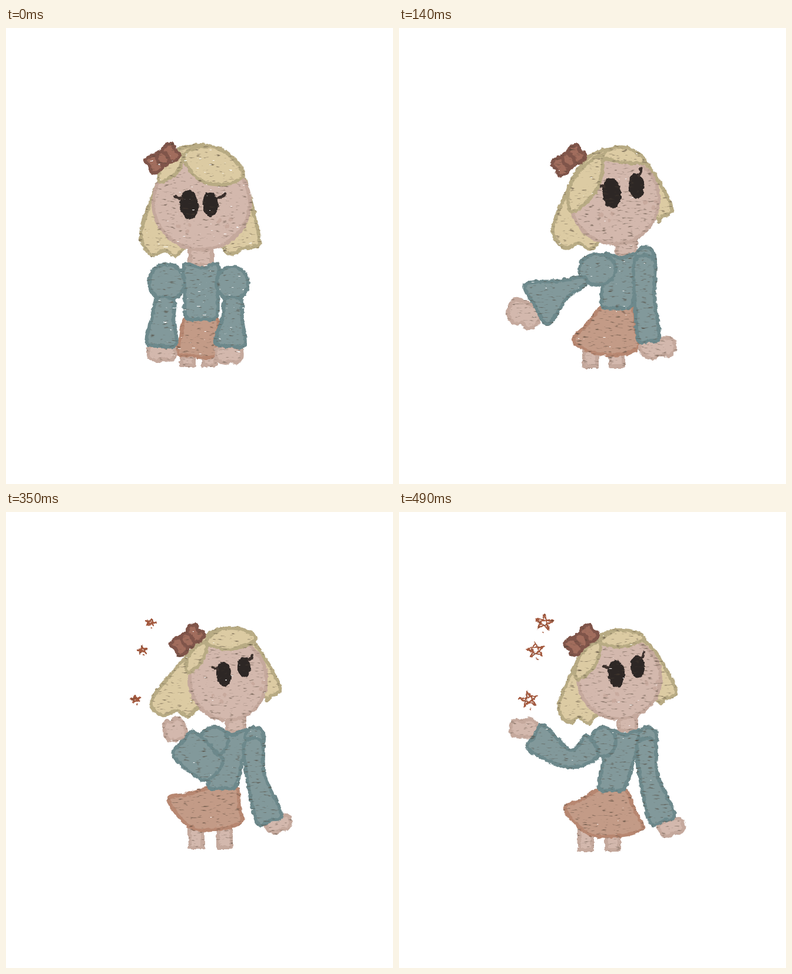
Animation, 657 px wide and 776 px high, one loop 0.56 s. Source, as an HTML page:

```html
<!DOCTYPE html>
<html lang="en">
<head>
<meta charset="utf-8">
<title>Doll conjuring stars</title>
<style>
  html, body { margin: 0; width: 100%; height: 100%; overflow: hidden; background: #fff; }
  svg {
    position: absolute; left: 0; top: 0; width: 657px; height: 776px;
    opacity: 0; will-change: opacity;
    animation: show 560ms step-end infinite;
  }
  @keyframes show { 0% { opacity: 1 } 12.5%, 100% { opacity: 0 } }
</style>
</head>
<body>
<script>
const colors = {
  hair: ['#dccba3', '#b8ab84'], skin: ['#d3b8ad', '#c5a99d'], wool: ['#82999b', '#6d898c'],
  skirt: ['#c39b87', '#b78771'], bow: ['#a16d5d', '#80554a']
};
const paint = name => `fill="${colors[name][0]}" stroke="${colors[name][1]}" stroke-width="6"`;

const lerp = (a, b, t) => a + (b - a) * t;
const shift = (p, n, k) => [p[0] + n[0] * k, p[1] + n[1] * k];
const along = (a, b, t) => [lerp(a[0], b[0], t), lerp(a[1], b[1], t)];
const normal = (a, b) => [a[1] - b[1], b[0] - a[0]];
const unit = ([x, y]) => [x / Math.hypot(x, y), y / Math.hypot(x, y)];
const turned = (inner, x, y, angle, scale = 1) =>
  `<g transform="translate(${x} ${y}) rotate(${angle}) scale(${scale})">${inner}</g>`;

// Closed Catmull-Rom curve through the points.
function blob(p, name) {
  const at = i => p[(i + p.length) % p.length];
  const handle = (i, sign) => along(at(i), shift(at(i), normal2(at(i - 1), at(i + 1)), sign), 1 / 6);
  const curve = p.map((_, i) => `C${handle(i, 1)} ${handle(i + 1, -1)} ${at(i + 1)}`).join('');
  return `<path d="M${p[0]}${curve}Z" ${paint(name)}/>`;
}
function normal2(a, b) { return [b[0] - a[0], b[1] - a[1]]; }

const oval = (x, y, rx, ry, look) => `<ellipse cx="${x}" cy="${y}" rx="${rx}" ry="${ry}" ${look}/>`;
const box = (x, y, w, bottom) =>
  `<rect x="${x}" y="${y}" width="${w}" height="${bottom - y}" ${paint('skin')}/>`;

function hair([cx, cy, rx, ry], top, [lx, ly, lw], [ex, ey, ew]) {
  const crown = [cx - rx / 2 - (cx - lx) / 4, cy - ry * 0.65];
  const side = [lx, lerp(ly, cy, 0.35)];
  return blob([
    [cx, top], [cx - rx * 0.55, top + 12], crown, shift(along(crown, side, 0.5), [-1, 0], 4), side,
    [lx + lw * 0.25, ly], [lx + lw * 0.55, ly - 8], [lx + lw * 0.78, ly + 2], [lx + lw, ly - 12],
    [cx, cy + ry * 0.4],
    [ex - ew, ey - 6], [ex - ew * 0.7, ey + 1], [ex - ew / 2, ey - 8], [ex - ew * 0.15, ey - 11], [ex, ey - 26],
    [cx + rx / 2 + (ex - cx) * 0.3, cy - ry * 0.6], [cx + rx * 0.55, top + 16]
  ], 'hair');
}

function lock(part, tip) {
  const n = normal(tip, part);
  return blob([
    part, shift(along(part, tip, 0.5), n, 0.17), tip,
    shift(along(part, tip, 0.8), n, -0.2), shift(along(part, tip, 0.4), n, -0.22)
  ], 'hair');
}

function bang(part, [x, y, rise, sag]) {
  const end = [x, y], n = unit(normal(part, end));
  const edge = (t, k) => shift(along(part, end, t), n, k);
  return blob([
    part, edge(0.2, -rise * 0.75), edge(0.5, -rise), edge(0.82, -rise * 0.65),
    end, edge(0.8, sag * 0.7), edge(0.45, sag), edge(0.2, sag * 0.7)
  ], 'hair');
}

function bow([x, y, angle]) {
  const lobe = side => blob([[4, -8], [15, -15], [27, -12], [25, 0], [29, 9], [18, 15], [4, 8]]
    .map(([u, v]) => [u * side, v]), 'bow');
  return turned(lobe(-1) + lobe(1) + oval(0, 0, 9, 13, paint('bow')), x, y, angle);
}

function eyes([x1, y1, x2, y2, size], [dx, dy]) {
  const eye = (x, y, s, tilt) => turned(oval(0, 0, s * 0.62, s, 'fill="#2d2725"'), x, y, tilt);
  const lash = (...p) => `<polyline points="${p}" fill="none" stroke="#3b302c" stroke-width="5"/>`;
  const freckles = (x, y) => [[-10, -4], [4, 5], [9, -6]]
    .map(([u, v]) => oval(x + u, y + v, 3.5, 3.5, 'fill="#c8aa9e"')).join('');
  const s = size * 0.84;
  return freckles(x1 - 8, y1 + 41) + freckles(x2 + 25, y2 + 32) +
    eye(x1, y1, size, -5) + eye(x2, y2, s, -3) +
    lash(x1 - size * 0.5, y1 - size * 0.4, x1 - size * 0.8, y1 - size * 0.5, x1 - size * 0.95, y1 - size * 0.55) +
    lash(x2 + dx * 0.5, y2 + dy * 0.6, x2 + dx * 0.9, y2 + dy * 0.8, x2 + dx, y2 + dy);
}

function sleeve([ax, ay, aw], [ex, ey, ew], [cx, cy, cw]) {
  const a = [ax, ay], e = [ex, ey], c = [cx, cy];
  const na = unit(normal(a, e)), ne = unit(normal(a, c)), nc = unit(normal(e, c));
  return blob([
    shift(a, na, aw / 2), shift(e, ne, ew / 2), shift(c, nc, cw / 2),
    shift(c, [nc[1], -nc[0]], 4),
    shift(c, nc, -cw / 2), shift(e, ne, -ew / 2), shift(a, na, -aw / 2)
  ], 'wool');
}

const hand = ([x, y, w, h, angle]) => turned(blob(
  [[-0.9, -0.9], [-1, 0.4], [-0.4, 1], [0.1, 0.7], [0.6, 0.9], [1, 0.3], [0.8, -0.9]]
    .map(([u, v]) => [u * w, v * h]), 'skin'), x, y, angle);

function skirt([wl, wr, y], [lx, ly], [rx, ry], bottom) {
  return blob([
    [wl, y], [(wl + wr) / 2, y], [wr, y], along([wr, y], [rx, ry], 0.55), [rx, ry],
    [lerp(lx, rx, 0.7), bottom], [lerp(lx, rx, 0.3), bottom - 4], [lx, ly], along([wl, y], [lx, ly], 0.55)
  ], 'skirt');
}

function torso([l, r, y], [wl, wr, waist]) {
  return blob([
    [l, y], [(l + r) / 2, y + 6], [r, y], along([r, y], [wr, waist], 0.5), [wr - 2, waist - 3],
    [(wl + wr) / 2, waist], [wl + 2, waist - 3], along([l, y], [wl, waist], 0.5)
  ], 'wool');
}

function stars([r, flat]) {
  const tips = [0, 1, 2, 3, 4].map(i => {
    const a = i * Math.PI * 0.8 - Math.PI / 2;
    return [r * Math.cos(a), r * flat * Math.sin(a)];
  });
  const shape = `<path d="M${tips.join('L')}Z" fill="none" stroke="#a4593e" stroke-width="2.6"/>` +
    oval(1, r, 1.3, 1.3, 'fill="#a4593e"');
  return turned(shape, 246, 188, 6) + turned(shape, 232, 235, -8) + turned(shape, 220, 319, -9);
}

// Limb joints are [x, y, width]; hair ends are [x, y, width of the curl].
const front = {
  face: [332, 298, 82, 79], top: [199], curlL: [229, 386, 73], curlR: [430, 383, 60],
  part: [302, 216], lockTip: [262, 262], bang: [402, 252, 30, 32], bow: [266, 222, -34],
  eyes: [311, 301, 347, 300, 25], lash: [26, -18],
  neck: [331, 38, 403], legs: [297, 334, 560, 574],
  waist: [304, 359, 495], hemL: [291, 553], hemR: [357, 556], hem: [561], shoulders: [303, 360, 403],
  puffL: [273, 433, 30, 31], puffR: [384, 434, 27, 28],
  armL: [271, 462, 28], elbowL: [266, 495, 37], cuffL: [264, 537, 50],
  armR: [386, 462, 26], elbowR: [384, 495, 34], cuffR: [381, 537, 50],
  handL: [265, 554, 22, 13, 0], handR: [379, 557, 21, 14, 0]
};
const lean = {
  face: [344, 304, 65, 65], top: [227], curlL: [252, 379, 57], curlR: [430, 359, 38],
  part: [302, 238], lockTip: [281, 310], bang: [380, 243, 14, 7], bow: [284, 230, -41],
  eyes: [330, 291, 365, 281, 22], lash: [9, -24],
  neck: [348, 36, 400], legs: [302, 335, 556, 574],
  waist: [308, 364, 486], hemL: [283, 545], hemR: [383, 550], hem: [557], shoulders: [313, 378, 398],
  puffL: [303, 414, 18, 17], puffR: [384, 416, 16, 18],
  armL: [298, 420, 34], elbowL: [268, 475, 40], cuffL: [248, 524, 58],
  armR: [386, 415, 30], elbowR: [390, 475, 24], cuffR: [403, 532, 38],
  handL: [246, 538, 20, 12, 5], handR: [405, 549, 18, 10, 0]
};
const reach = {
  face: [366, 292, 75, 75], top: [205], curlL: [261, 374, 80], curlR: [462, 328, 30],
  part: [344, 218], lockTip: [296, 313], bang: [418, 228, 20, 6], bow: [288, 225, -38],
  eyes: [361, 281, 403, 269, 26], lash: [8, -30],
  neck: [386, 33, 386], legs: [314, 359, 550, 576],
  waist: [343, 397, 476], hemL: [296, 532], hemR: [406, 543], hem: [556], shoulders: [350, 405, 386],
  puffL: [337, 411, 31, 26], puffR: [418, 396, 17, 23],
  armL: [314, 430, 14], elbowL: [278, 445, 32], cuffL: [234, 470, 78],
  armR: [417, 395, 33], elbowR: [417, 460, 33], cuffR: [424, 528, 36],
  handL: [212, 488, 26, 20, 25], handR: [440, 545, 28, 16, -6]
};
const cross = {
  face: [374, 287, 74, 64], top: [199], curlL: [272, 361, 72], curlR: [473, 323, 33],
  part: [341, 213], lockTip: [300, 296], bang: [412, 218, 15, 12], bow: [305, 215, -38],
  eyes: [368, 275, 404, 264, 23], lash: [17, -26],
  neck: [385, 34, 388], legs: [309, 360, 550, 573],
  waist: [333, 398, 480], hemL: [279, 513], hemR: [401, 543], hem: [553], shoulders: [352, 400, 387],
  puffL: [344, 409, 28, 26], puffR: [423, 411, 20, 26],
  armL: [342, 427, 22], elbowL: [375, 458, 40], cuffL: [421, 398, 68],
  armR: [422, 410, 34], elbowR: [428, 460, 30], cuffR: [446, 522, 54],
  handL: [426, 373, 19, 19, 180], handR: [457, 541, 24, 16, -5]
};
const windUp = {
  ...cross,
  face: [377, 285, 65, 69], top: [197], curlL: [246, 346, 80], curlR: [464, 320, 29],
  part: [340, 221], lockTip: [310, 273], bang: [424, 214, 20, 16], bow: [308, 218, -40],
  eyes: [370, 276, 404, 264, 21], lash: [14, -19],
  neck: [390, 30, 374], legs: [312, 360, 537, 571],
  waist: [342, 392, 470], hemL: [276, 490], hemR: [399, 527], hem: [540], shoulders: [356, 411, 373],
  puffL: [353, 390, 24, 24], puffR: [422, 385, 16, 19],
  armL: [362, 418, 20], elbowL: [347, 432, 52], cuffL: [302, 395, 54],
  armR: [420, 392, 30], elbowR: [424, 450, 30], cuffR: [447, 521, 44],
  handL: [286, 369, 17, 18, 165], handR: [463, 531, 20, 13, -15], stars: [9, 0.65]
};
const cast = {
  ...windUp,
  face: [374, 283, 70, 69], top: [201], curlL: [271, 358, 64], curlR: [469, 325, 34],
  part: [341, 220], lockTip: [305, 285], bang: [416, 214, 16, 12], bow: [310, 218, -40],
  eyes: [369, 275, 405, 263, 23], lash: [10, -23],
  neck: [388, 30, 372], legs: [306, 352, 541, 575],
  waist: [338, 385, 473], hemL: [282, 505], hemR: [413, 538], hem: [551],
  puffL: [347, 391, 21, 25],
  armL: [328, 398, 40], elbowL: [290, 420, 29], cuffL: [233, 384, 48],
  handL: [212, 367, 22, 15, 180], handR: [463, 537, 20, 13, -12], stars: [16, 0.85]
};

const midway = (a, b) => Object.fromEntries(
  Object.keys(a).map(key => [key, a[key].map((v, i) => lerp(v, b[key][i], 0.5))]));

const figure = p => [
  hair(p.face, p.top[0], p.curlL, p.curlR),
  box(p.neck[0] - p.neck[1] / 2, p.face[1] + p.face[3] - 4, p.neck[1], p.neck[2]),
  box(p.legs[0], p.legs[2], 22, p.legs[3]),
  box(p.legs[1], p.legs[2], 22, p.legs[3]),
  skirt(p.waist, p.hemL, p.hemR, p.hem[0]),
  hand(p.handL), hand(p.handR),
  torso(p.shoulders, p.waist),
  oval(...p.puffR, paint('wool')), sleeve(p.armR, p.elbowR, p.cuffR),
  oval(...p.puffL, paint('wool')), sleeve(p.armL, p.elbowL, p.cuffL),
  oval(...p.face, paint('skin')),
  eyes(p.eyes, p.lash),
  lock(p.part, p.lockTip), bang(p.part, p.bang), bow(p.bow),
  p.stars ? stars(p.stars) : ''
].join('');

// Rough crayon edges, dark horizontal grain and small gaps.
const crayon = (id, gap) => `
  <filter id="crayon${id}" filterUnits="userSpaceOnUse" x="170" y="160" width="340" height="430" color-interpolation-filters="sRGB">
    <feTurbulence type="fractalNoise" baseFrequency=".14" numOctaves="2" seed="${id + 3}" result="wobble"/>
    <feDisplacementMap in="SourceGraphic" in2="wobble" scale="6" xChannelSelector="R" yChannelSelector="G" result="art"/>
    <feTurbulence type="fractalNoise" baseFrequency=".09 .32" numOctaves="2" seed="${id + 21}" result="noise"/>
    <feColorMatrix in="noise" values="0 0 0 0 .3  0 0 0 0 .25  0 0 0 0 .2  3 0 0 0 -1.9" result="grain"/>
    <feComposite in="grain" in2="art" operator="in" result="grain"/>
    <feMerge result="textured"><feMergeNode in="art"/><feMergeNode in="grain"/></feMerge>
    <feColorMatrix in="noise" values="0 0 0 0 0  0 0 0 0 0  0 0 0 0 0  0 20 0 0 ${-20 * gap}" result="gaps"/>
    <feComposite in="textured" in2="gaps" operator="out"/>
  </filter>`;

const poses = [front, lean, reach, cross, midway(cross, windUp), windUp, midway(windUp, cast), cast];
const gaps = [0.77, 0.73];

document.body.innerHTML = poses.map((pose, i) => `
  <svg viewBox="0 0 657 776" style="animation-delay:${i * 70 - 560}ms">
    ${crayon(i, gaps[i] || 0.81)}
    <g filter="url(#crayon${i})" stroke-linejoin="round" stroke-linecap="round">${figure(pose)}</g>
  </svg>`).join('');
</script>
</body>
</html>
```
